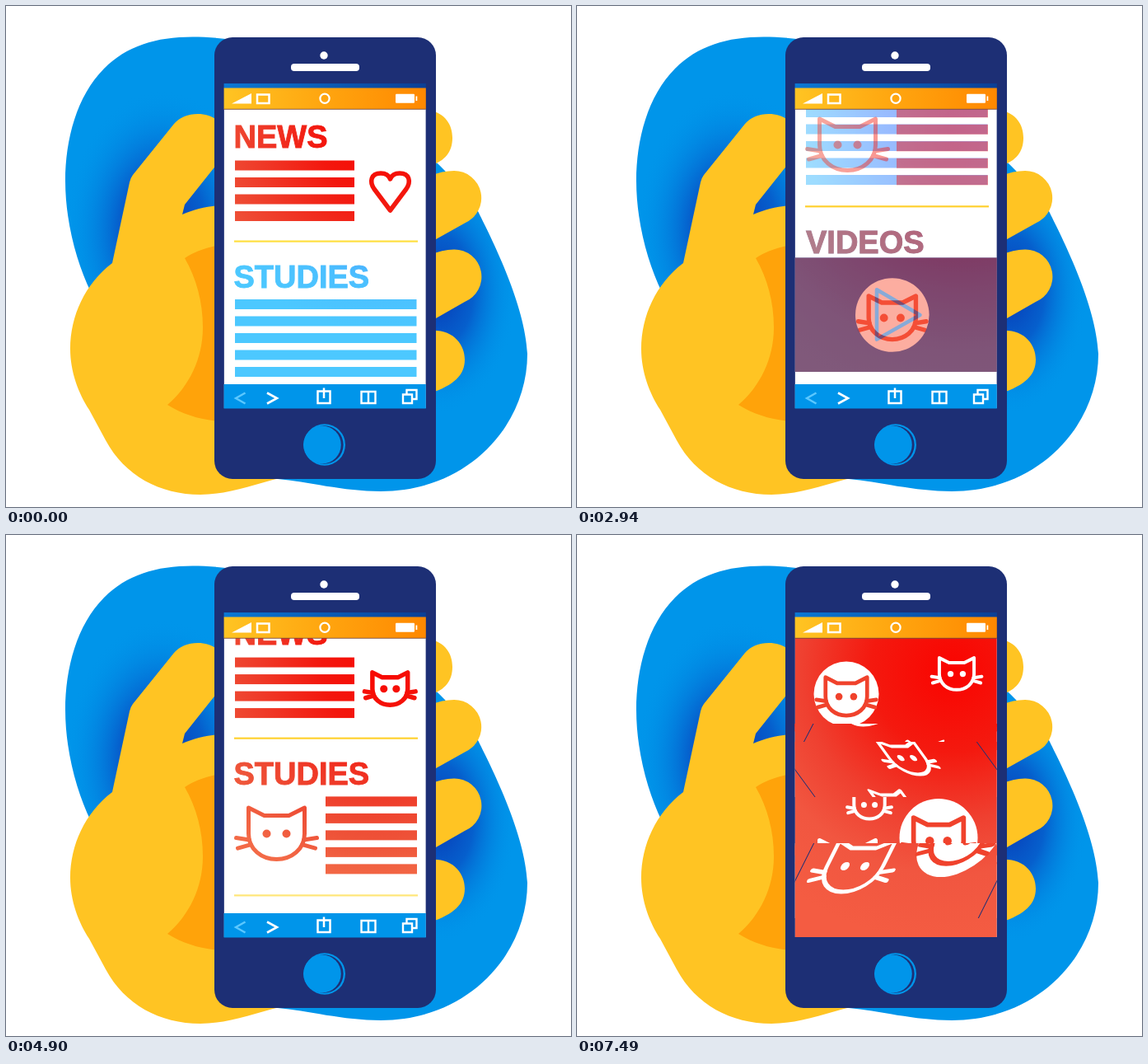
These frames come from a looping animation (686 px wide and 608 px high, 8 s). An HTML page:

```html
<!DOCTYPE html>
<html lang="en">
<head>
<meta charset="utf-8">
<title>Phone feed</title>
<style>
html, body { margin: 0; width: 100%; height: 100%; overflow: hidden; background: #fff; }
svg { display: block; width: 686px; height: 608px; }
text { font: bold 38px "Liberation Sans", Arial, sans-serif; stroke-width: .9px; }
</style>
</head>
<body>
<svg id="stage" viewBox="0 0 686 608"></svg>
<script>
const LOOP = 8000, STEP = 70, TRAVEL = 233;
const LEFT = 264.6, RIGHT = 509.8, WIDE = RIGHT - LEFT;
const NAVY = '#1d2f75', SKY = '#0095ea', SKIN = '#ffc423', RED = '#f0422c';

const rect = (x, y, w, h, fill, more = '') =>
  `<rect x="${x}" y="${y}" width="${w}" height="${h}" fill="${fill}" ${more}/>`;
const circle = (x, y, r, fill, more = '') =>
  `<circle cx="${x}" cy="${y}" r="${r}" fill="${fill}" ${more}/>`;
const path = (d, fill, more = '') => `<path d="${d}" fill="${fill}" ${more}/>`;
const line = (d, color, w, more = '') =>
  path(d, 'none', `stroke="${color}" stroke-width="${w}" ${more}`);
const title = (word, x, y, fill) =>
  `<text x="${x}" y="${y}" fill="${fill}" stroke="${fill}">${word}</text>`;
const rows = (n, x, y, w, fill) =>
  Array.from({ length: n }, (_, i) => rect(x, y + i * 20.5, w, 12, fill)).join('');
const rule = y => rect(277, y, 223, 2.2, 'url(#gold)');
const glow = (id, x, y, r, stops) =>
  `<radialGradient id="${id}" gradientUnits="userSpaceOnUse" cx="${x}" cy="${y}" r="${r}">` +
  stops.map(([o, c]) => `<stop offset="${o}" stop-color="${c}"/>`).join('') + '</radialGradient>';

// Cat face; absolute coordinates keep the shared gradients in place
function cat(x, y, s, color, w, fill = 'none') {
  const at = (px, py) => `${(x + px * s).toFixed(2)},${(y + py * s).toFixed(2)} `;
  const head = `M${at(-34, -30.5)}L${at(-15, -21)}L${at(15, -21)}L${at(34, -30.5)}L${at(34, 1)}` +
    `C${at(34, 20)}${at(18, 32)}${at(0, 32)}C${at(-18, 32)}${at(-34, 20)}${at(-34, 1)}Z`;
  const whiskers = [-1, 1].map(m =>
    `M${at(49 * m, 6)}L${at(33 * m, 8.5)}M${at(47 * m, 18.5)}L${at(31 * m, 14)}`).join('');
  const eye = w * .6 + 2 * s;
  return path(head, fill, `stroke="${color}" stroke-width="${w}" stroke-linejoin="round"`) +
    line(whiskers, color, w, 'stroke-linecap="round"') +
    circle(x - 12 * s, y + s, eye, color) + circle(x + 12 * s, y + s, eye, color);
}
const badge = (x, y, r) =>
  circle(x, y, r, '#fff') + cat(x, y + r * .06, r * .0188, RED, r * .12, '#fff');

// Sheared bands: top, bottom, slope, row with no shift, step at which it appears
const bands = [
  [229, 251, -.52, 272, 12],
  [251, 318, .73, 284.5, 11],
  [374, 465, -.5, 420, 0]
];
const bandClip = ([a, b], i) =>
  `<clipPath id="band${i}">${rect(LEFT, a, WIDE, b - a, '#000')}</clipPath>`;
const tiles = id => [-WIDE, 0, WIDE].map(x =>
  `<g transform="translate(${x} 0)"><g clip-path="url(#view)"><use href="#${id}"/></g></g>`).join('');
function bandArt([a, b, k, zero], i) {
  const sheared = art => `<g transform="matrix(1 0 ${k} 1 ${-k * zero} 0)">${art}</g>`;
  return `<g id="shear${i}" clip-path="url(#band${i})" display="none">` +
    rect(LEFT, a, WIDE, b - a, '#fff') + sheared(tiles('page')) + '<use href="#wash"/>' +
    sheared(tiles('crowd') + line(`M${LEFT},100V500M${RIGHT},100V500`, NAVY, 1.1)) + '</g>';
}

// Cats of the last scene with the step at which each one appears
const crowd = [
  [4, cat(328.5, 401, 1, '#fff', 5)],
  [6, cat(461, 168, .62, '#fff', 4)],
  [7, badge(327, 193, 39.5)],
  [8, cat(411, 270, .64, '#fff', 4)],
  [9, cat(355, 327, .55, '#fff', 4)],
  [10, badge(439, 367.5, 47.5)]
];

const blob = 'M275,41C207,32 156,39 119,76C86,109 72,162 72,212C72,262 86,312 103,347L250,520L330,574' +
  'C365,577 410,589 455,589C560,589 633,510 633,422C630,358 584,272 572,247C550,216 535,202 521,188L400,90Z';
const hand = 'M260,142C253,134 243,131 233,131C221,131 211,135 204,143L154,205Q151,209 150,214L129,312' +
  'C96,337 78,376 78,416C78,444 88,470 101,490L121,527C144,570 187,593 236,593C268,593 300,581 332,573' +
  'L300,400L260,242C244,243 228,247 214,253L217,241L260,187Z';

const defs = `<defs>
  ${glow('red', 455, 165, 330, [[0, '#f80800'], [.22, '#f3170e'], [.45, '#ef3a28'], [.62, '#ee5238'], [.78, '#f36a47'], [1, '#f36a47']])}
  ${glow('fire', 455, 165, 330, [[0, '#fa0400'], [.3, '#f4190f'], [.55, '#ef4030'], [.75, '#f15640'], [1, '#f45c42']])}
  ${glow('light', 470, 140, 260, [[0, '#3f6cff'], [.35, '#4080ff'], [.75, '#4bbfff'], [1, '#4cc8ff']])}
  ${glow('deep', 470, 140, 320, [[0, '#0a35a0'], [.6, '#0c4aaa'], [1, '#0d58b4']])}
  <linearGradient id="gold" gradientUnits="userSpaceOnUse" x1="0" y1="130" x2="0" y2="440">
    <stop stop-color="#ffa800"/><stop offset=".5" stop-color="#ffdf40"/><stop offset="1" stop-color="#ffe67a"/></linearGradient>
  <linearGradient id="bar"><stop stop-color="#ffc423"/><stop offset=".5" stop-color="#ffa50f"/><stop offset="1" stop-color="#ff8800"/></linearGradient>
  <linearGradient id="strip"><stop stop-color="#0b78d4"/><stop offset="1" stop-color="#0b3f96"/></linearGradient>
  <radialGradient id="shade"><stop stop-color="#0838b4"/><stop offset=".45" stop-color="#0848c0" stop-opacity=".7"/>
    <stop offset="1" stop-color="#0095ea" stop-opacity="0"/></radialGradient>
  <clipPath id="blobClip"><path d="${blob}"/></clipPath>
  <clipPath id="view">${rect(LEFT, 125, WIDE, 363, '#000')}</clipPath>
  ${bands.map(bandClip).join('')}
</defs>`;

const back = path(blob, SKY) + `<g clip-path="url(#blobClip)" fill="url(#shade)">
  <ellipse cx="190" cy="272" rx="118" ry="170"/><ellipse cx="525" cy="345" rx="95" ry="150"/></g>` +
  path(hand, SKIN) +
  path('M217,306C228,299 240,294 260,290V504C234,502 214,495 196,484C222,462 239,428 239,390C239,359 231,330 217,306Z', '#ffa30a') +
  path('M515,127C533,130 542,144 542,160C542,177 533,188 515,194Z' +
    'M515,206C525,202 534,200 544,200A33,33 0 0 1 557,263.4L515,287Z' +
    'M515,302C525,298 534,295.5 544,295.5A33,33 0 0 1 557,359L515,383Z' +
    'M515,394C543,392 557,411 557,429C557,448 544,460 515,470Z', SKIN) +
  rect(253, 38, 269, 536, NAVY, 'rx="22"') +
  circle(386, 60, 4.7, '#fff') + rect(346, 70, 83, 9, '#fff', 'rx="4"') +
  circle(386.8, 532.5, 25.2, SKY) + circle(386.3, 532.5, 23.3, NAVY) + circle(383.9, 532.5, 22.9, SKY);

const page = `<g id="page">` +
  title('NEWS', 276.5, 172, 'url(#red)') + rows(4, 278, 187.5, 145, 'url(#red)') + rule(284.5) +
  rule(475.2) +
  `<g id="calm">` +
    line('M466.5,248L447,222C441,213 443,203 455,203C461,203 465,206 466.5,210C468,206 472,203 478,203C490,203 492,213 486,222Z',
      'url(#red)', 5.5, 'stroke-linejoin="round"') +
    title('STUDIES', 276.5, 342, 'url(#light)') + rows(5, 278, 356, 220.5, 'url(#light)') +
    title('VIDEOS', 278, 533, 'url(#deep)') + `</g>` +
  `<g id="wild">` +
    cat(466.3, 225, .63, 'url(#red)', 5.5) +
    title('STUDIES', 276.5, 342, 'url(#red)') + rows(5, 388, 356.3, 111, 'url(#red)') +
    cat(328.5, 400.5, 1, 'url(#red)', 5) +
    title('VIDEOS', 278, 533, 'url(#red)') + `</g>` +
  `<g id="video">` +
    rect(278, 547, 221, 121.5, 'url(#deep)') + circle(383.5, 608, 39.3, '#f95a40') +
    line('M367,581L413,608L367,634Z', '#0f55b0', 4, 'stroke-linejoin="round"') +
    `<g id="wildVideo">` + rect(278, 547, 221, 121.5, 'url(#fire)') + badge(383.5, 608, 39.3) + `</g></g></g>`;

const screen = `<g clip-path="url(#view)">` + rect(LEFT, 125, WIDE, 363, '#fff') + page +
  rect(LEFT, 125, WIDE, 363, 'url(#fire)', 'id="wash" opacity="0"') + `<g id="crowd">` +
  crowd.map(([, art], i) => `<g id="crowd${i}" display="none">${art}</g>`).join('') + `</g></g>`;

const topBar = rect(LEFT, 94, WIDE, 6, 'url(#strip)') + rect(LEFT, 99.5, WIDE, 25.5, 'url(#bar)') +
  rect(LEFT, 124.8, WIDE, .9, '#7a4a3a') +
  path('M274,118.5L298,106V118.5Z', '#fff') + line('M305,107.5H319.5V118H305Z', '#fff', 2.5) +
  circle(387, 112.3, 5.6, 'none', 'stroke="#fff" stroke-width="2.2"') +
  rect(473, 106.8, 23, 11, '#fff', 'rx="1"') + rect(497.5, 109.5, 1.8, 5.5, '#fff');

const toolbar = `<g id="tools">` + rect(LEFT, 459, WIDE, 29.5, SKY) +
  line('M290.5,469.5L279,476L290.5,482.5', '#5cc8ff', 2.4) +
  line('M317,469.5L329,476L317,482.5', '#fff', 2.6) +
  line('M378.5,467.5H393.5V482H378.5ZM386,463.5V476', '#fff', 2.5) +
  line('M431.5,468H448.5V482H431.5ZM440,468V482', '#fff', 2.4) +
  line('M482,471.5H493V482H482ZM486.5,471V466H498.5V477H493', '#fff', 2.4) + `</g>`;

const stage = document.getElementById('stage');
stage.innerHTML = defs + back + screen + bands.map(bandArt).join('') + toolbar + topBar;

const el = id => document.getElementById(id);
const set = (id, name, value) => el(id).setAttribute(name, value);
const show = (id, on) => set(id, 'display', on ? 'inline' : 'none');

// Share of n steps taken since start, held for one step each
const done = (t, start, n) => Math.min(1, Math.max(0, (Math.floor((t - start) / STEP) + 1) / n));
const glide = x => x * (1.2062 + .4788 * x - .685 * x * x + .59 * (x - .4375) * (x - .6875) * (x - 1));

function draw(t) {
  const scroll = TRAVEL * (glide(done(t, 770, 16)) - glide(done(t, 4200, 16)));
  set('page', 'transform', `translate(0 ${-scroll})`);
  for (const id of ['red', 'fire', 'light', 'deep', 'gold']) set(id, 'gradientTransform', `translate(0 ${scroll})`);

  const turn = done(t, 2590, 13), flip = done(t, 2590, 12);
  const swell = 1 + .14 * Math.sin(Math.PI * flip);
  set('calm', 'opacity', 1 - turn);
  set('wild', 'opacity', turn);
  set('wildVideo', 'opacity', flip);
  set('video', 'transform', `translate(388.5 608) scale(${swell}) translate(-388.5 -608)`);

  const n = Math.floor((t - 6650) / STEP);
  const wash = Math.min(1, Math.max(0, (n - 1) / 3));
  set('wash', 'opacity', wash);
  set('tools', 'opacity', 1 - wash);
  bands.forEach((b, i) => show('shear' + i, n >= b[4]));
  crowd.forEach(([from], i) => show('crowd' + i, n >= from));
}

const begin = performance.now();
function frame() {
  draw((performance.now() - begin) % LOOP);
  requestAnimationFrame(frame);
}
frame();
</script>
</body>
</html>
```
